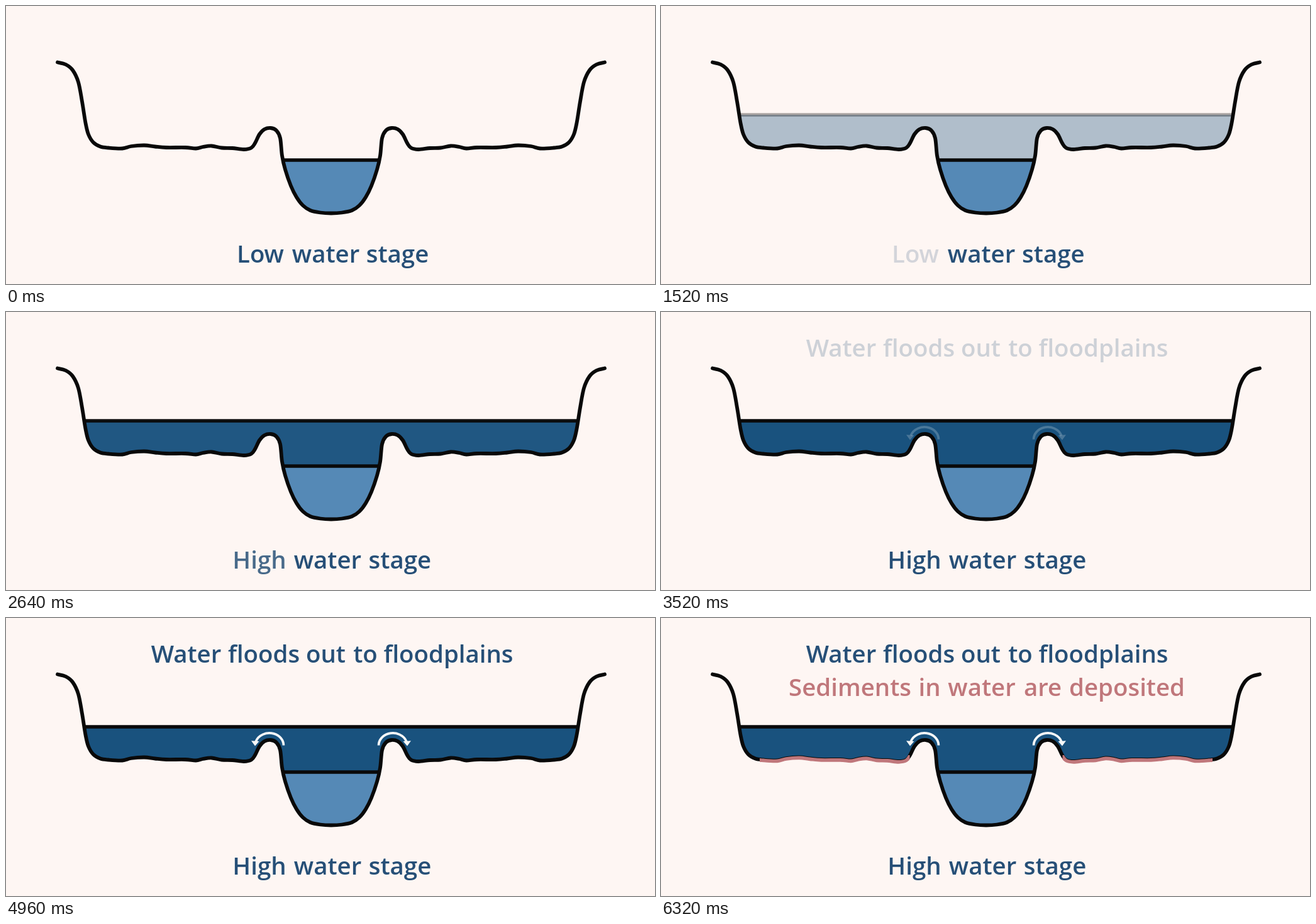
These frames come from a looping animation (1032 px wide and 442 px high, 8480 ms). An HTML page with a canvas:

```html
<!DOCTYPE html>
<html lang="en">
<head>
<meta charset="utf-8">
<title>Floodplain stages</title>
<style>
  html, body { margin: 0; width: 100%; height: 100%; overflow: hidden; background: #fef6f3; }
  canvas { display: block; }
</style>
</head>
<body>
<canvas id="stage" width="1032" height="442"></canvas>
<script>
const W = 1032, H = 442, AXIS = 517, LOOP = 8480, STEP = 80;
const INK = '#090909', NAVY = '#264f77', ROSE = '#c0777b';
const DEEP = '#19527e', RIVER = '#5589b6', PAPER = '#fef6f3';
const HIGH_Y = 173, LOW_Y = 245;
const ctx = document.getElementById('stage').getContext('2d');

// Left half of the valley profile; the right half is its mirror image.
const half = [
  [82, 89.5], [95, 93], [106, 102], [115, 121], [121, 152], [126.5, 186], [131, 204],
  [139, 217], [150, 223.5], [163, 225.5], [185, 226.5], [199, 223], [220, 221.5],
  [237, 223.5], [255, 225], [285, 225], [302, 226.5], [313, 224], [327, 222.5],
  [343, 225.5], [360, 226], [378, 228], [390, 225.5], [396, 218], [403, 204],
  [411, 196], [421, 194], [430, 198], [436, 210], [439, 238], [444, 260],
  [453, 286], [462, 304], [472, 317], [484, 325], [500, 328.5]
];
const mirror = ([x, y]) => [2 * AXIS - x, y];
const profile = [...half, [AXIS, 329.5], ...half.map(mirror).reverse()];

// Smooth curve through the points (Catmull-Rom).
function smooth(pts) {
  const path = new Path2D();
  const at = i => pts[Math.max(0, Math.min(pts.length - 1, i))];
  path.moveTo(...pts[0]);
  for (let i = 0; i < pts.length - 1; i++) {
    const [a, b, c, d] = [at(i - 1), at(i), at(i + 1), at(i + 2)];
    path.bezierCurveTo(
      b[0] + (c[0] - a[0]) / 6, b[1] + (c[1] - a[1]) / 6,
      c[0] - (d[0] - b[0]) / 6, c[1] - (d[1] - b[1]) / 6,
      c[0], c[1]);
  }
  return path;
}
const ground = smooth(profile);

const clamp = v => Math.max(0, Math.min(1, v));
const ramp = (t, start, length) => clamp((t - start) / length);
const easeOut = v => Math.sin(v * Math.PI / 2);
const mix = (a, b, v) => a + (b - a) * v;

// Runs a drawing step at the given opacity in its own state.
function layer(alpha, draw) {
  if (alpha <= 0) return;
  ctx.save();
  ctx.globalAlpha = alpha;
  draw();
  ctx.restore();
}

function words(list, y, color, alpha = 1) {
  layer(alpha, () => {
    ctx.font = '600 38.4px "Open Sans", "Noto Sans", sans-serif';
    ctx.textAlign = 'center';
    ctx.fillStyle = color;
    for (const [word, x] of list) ctx.fillText(word, x, y);
  });
}

function water(top, bottom, color, alpha) {
  layer(alpha, () => {
    ctx.clip(ground);
    ctx.fillStyle = color;
    ctx.fillRect(0, top, W, bottom - top);
  });
}

function surface(y, left, alpha) {
  layer(alpha, () => {
    ctx.fillStyle = INK;
    ctx.fillRect(left, y - 2.75, 2 * (AXIS - left), 5.5);
  });
}

function arrow(flip) {
  ctx.save();
  if (flip) {
    ctx.translate(2 * AXIS, 0);
    ctx.scale(-1, 1);
  }
  ctx.strokeStyle = ctx.fillStyle = '#f7f8f8';
  ctx.lineWidth = 3.8;
  ctx.beginPath();
  ctx.ellipse(418.8, 202.5, 22.6, 19.5, 0, Math.PI * 1.1, Math.PI * 2);
  ctx.stroke();
  ctx.beginPath();
  ctx.moveTo(390, 195.3);
  ctx.lineTo(402.5, 196);
  ctx.lineTo(396, 203.5);
  ctx.fill();
  ctx.restore();
}

function sediment() {
  ctx.beginPath();
  ctx.rect(157, 218, 238.5, 20);
  ctx.rect(2 * AXIS - 395.5, 218, 238.5, 20);
  ctx.clip();
  ctx.translate(0, 0.9);
  ctx.strokeStyle = ROSE;
  ctx.lineWidth = 5.6;
  ctx.stroke(ground);
}

function draw(t) {
  const rise = easeOut(ramp(t, 1120, 1800));
  const flood = easeOut(ramp(t, 3440, 560));
  const settle = easeOut(ramp(t, 5760, 560));

  ctx.fillStyle = PAPER;
  ctx.fillRect(0, 0, W, H);

  water(LOW_Y, 332, RIVER, 1);
  water(HIGH_Y, LOW_Y, DEEP, rise);
  surface(HIGH_Y, 126, rise);
  surface(LOW_Y, 441, 1);

  ctx.strokeStyle = INK;
  ctx.lineWidth = 5.8;
  ctx.lineCap = ctx.lineJoin = 'round';
  ctx.stroke(ground);

  layer(settle, sediment);
  layer(flood, () => {
    ctx.lineCap = 'butt';
    arrow(false);
    arrow(true);
  });

  words([['Low', 404.5]], 408, NAVY, 1 - ramp(t, 1120, 500));
  words([['High', 403]], 408, NAVY, ramp(t, 2000, 760));
  words([['water', mix(508.5, 511.5, rise)], ['stage', mix(622.5, 626.5, rise)]], 408, NAVY);

  words([['Water', 286.5], ['floods', 410], ['out', 508.5], ['to', 571.5],
    ['floodplains', 703.5]], 71, NAVY, flood);
  words([['Sediments', 300.5], ['in', 427], ['water', 510], ['are', 607],
    ['deposited', 741]], 124, ROSE, settle);
}

const begin = performance.now();
function tick() {
  const t = (performance.now() - begin) % LOOP;
  draw(Math.floor(t / STEP) * STEP);
  requestAnimationFrame(tick);
}
tick();
</script>
</body>
</html>
```
